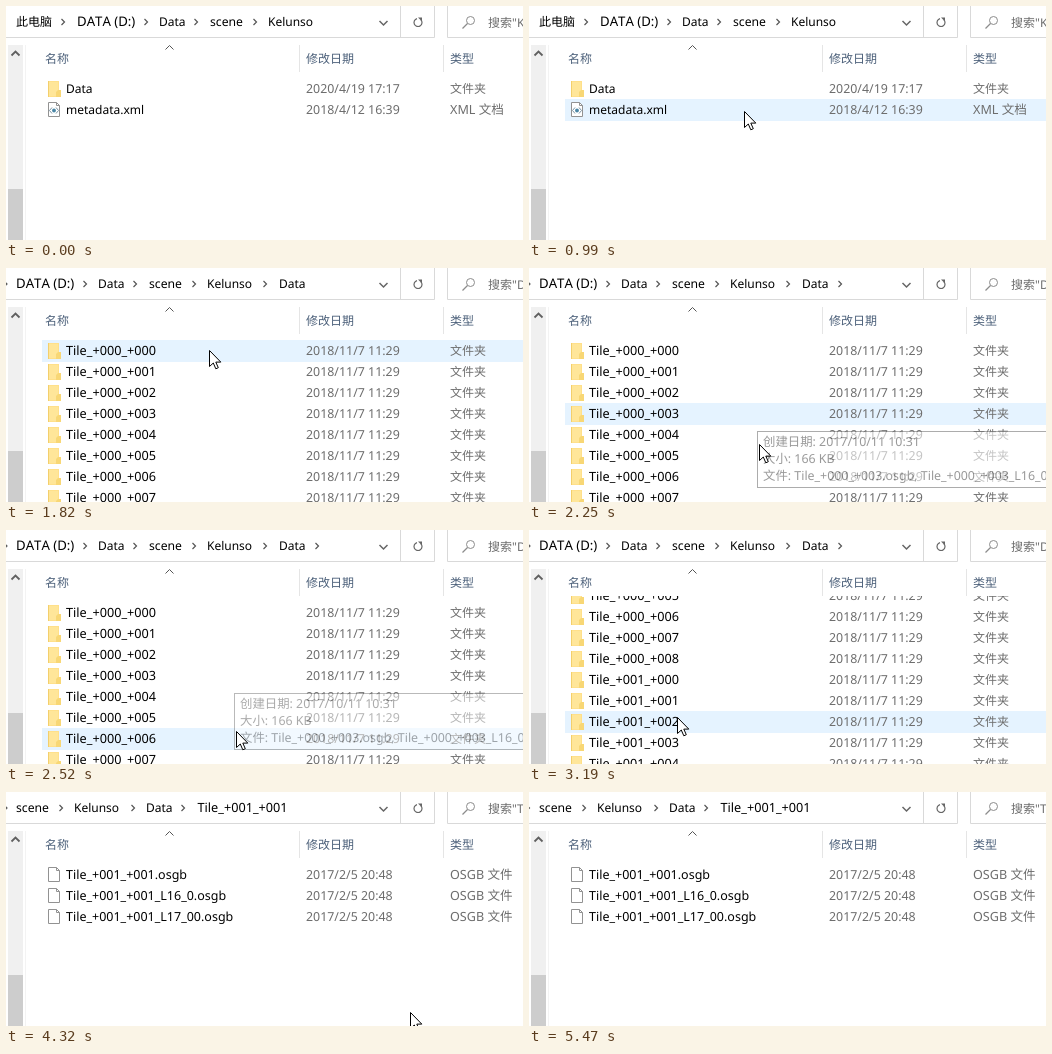
An HTML page that plays this animation: 517x234 px, repeating every 5570 ms.

```html
<!DOCTYPE html>
<html lang="zh-CN">
<head>
<meta charset="utf-8">
<title>文件夹浏览</title>
<style>
  html, body { margin: 0; width: 100%; height: 100%; overflow: hidden; background: #fff; }
  svg { display: block; }
  text {
    font-family: "Noto Sans", "Noto Sans CJK SC", sans-serif;
    font-kerning: none;
    text-rendering: geometricPrecision;
    white-space: pre;
  }
  .line { fill: none; stroke-linecap: butt; }
</style>
</head>
<body>
<svg id="stage" width="517" height="234" viewBox="0 0 517 234">
  <defs>
    <clipPath id="pane"><rect y="66" width="517" height="168"/></clipPath>
    <g id="folder">
      <path d="M42 3h11v16H42z" fill="#ffe08a"/>
      <path d="M42 3h1v16h-1z" fill="#f3cf6c"/>
      <path d="M43 4h9v14h-9z" fill="#ffe699"/>
      <path d="M52 12h3v7h-5v-5z" fill="#f8d775"/>
    </g>
    <g id="page">
      <path d="M42.5 3.5h8l3 3v11h-11z" fill="#fff" stroke="#929292"/>
      <path d="M50.5 3.5v3h3" class="line" stroke="#929292"/>
    </g>
    <g id="xml">
      <use href="#page"/>
      <path d="M46 8.5l-2.5 3l2.5 3M50 8.5l2.5 3l-2.5 3" class="line" stroke="#7d95a5"/>
      <circle cx="48" cy="11.5" r="1.9" fill="#4a86a5"/>
    </g>
    <path id="next" class="line" d="M-1.5 -3L1.5 0L-1.5 3" stroke="#555" stroke-width="1.2"/>
  </defs>

  <rect width="517" height="234" fill="#fff"/>
  <rect id="mark" x="36" width="481" height="22"/>
  <g id="views"></g>

  <!-- address bar and search box -->
  <path class="line" d="M0 31.5H428.5V0M394.5 0V31M441.5 0V31.5H517" stroke="#d9d9d9"/>
  <path class="line" d="M373.5 15l4 4l4 -4" stroke="#666" stroke-width="1.5"/>
  <path class="line" d="M414.8 13.6A4 4 0 1 1 411 12.6" stroke="#666" stroke-width="1.2"/>
  <path d="M412 11.5h4v4z" fill="#666"/>
  <circle class="line" cx="464.5" cy="14.5" r="4" stroke="#8c8c8c"/>
  <path class="line" d="M461.5 17.5l-5 5" stroke="#8c8c8c" stroke-width="1.2"/>

  <!-- navigation scrollbar -->
  <rect x="2" y="39" width="15" height="195" fill="#f0f0f0"/>
  <rect x="2" y="183" width="15" height="51" fill="#cdcdcd"/>
  <path class="line" d="M19.5 39V234" stroke="#f3f3f3"/>
  <path class="line" d="M5.5 49.5l4 -4l4 4" stroke="#606060" stroke-width="1.8"/>

  <!-- column heads -->
  <path class="line" d="M293.5 39V66M437.5 39V66" stroke="#e5e5e5"/>
  <path class="line" d="M159.5 43.5l4 -4l4 4" stroke="#555"/>
  <g id="heads"></g>

  <g id="tip">
    <rect x="228.5" y="163.5" width="300" height="56" fill="#fff" stroke="#767676"/>
  </g>
  <path id="cursor" d="M.5 .5V16.5L4.3 13L6.8 18.8L9.3 17.7L6.8 12.1H11.8Z" fill="#fff" stroke="#000"/>
</svg>
<script>
const LOOP = 5570, ROW = 21, TOP = 72;
const GRAY = '#6d6d6d', HEAD = '#4c607a';
const $ = id => document.getElementById(id);

function add(parent, tag, attrs, content) {
  const el = document.createElementNS('http://www.w3.org/2000/svg', tag);
  for (const key in attrs) el.setAttribute(key, attrs[key]);
  if (content) el.textContent = content;
  parent.appendChild(el);
  return el;
}
const label = (parent, x, y, str, size = 12, fill = '#000') =>
  add(parent, 'text', { x, y, 'font-size': size, fill }, str);
const chevron = (parent, x) => add(parent, 'use', { href: '#next', x, y: 16 });

// crumbs: [x, name, size, x of the chevron behind it]
function makeView({ crumbs, search, rows, lead }) {
  const view = add($('views'), 'g', {});
  if (lead) chevron(view, lead).setAttribute('class', 'lead');
  for (const [x, name, size, next] of crumbs) {
    label(view, x, 20, name, size);
    if (next) chevron(view, next);
  }
  label(view, 482, 21, `搜索"${search}"`, 12, GRAY);
  const list = add(add(view, 'g', { 'clip-path': 'url(#pane)' }), 'g', {});
  rows.forEach(([icon, name, date, type, size = 12.7], i) => {
    const row = add(list, 'g', { transform: `translate(0 ${TOP + i * ROW})` });
    add(row, 'use', { href: '#' + icon });
    label(row, 60, 15, name, size);
    label(row, 300, 15, date, 12.4, GRAY);
    label(row, 444, 15, type, type === '文件夹' ? 12 : 12.6, GRAY);
  });
  return { view, list };
}

const tiles = Array.from({ length: 16 }, (_, i) =>
  ['folder', `Tile_+00${Math.floor(i / 9)}_+00${i % 9}`, '2018/11/7 11:29', '文件夹']);
const models = ['', '_L16_0', '_L17_00'].map(part =>
  ['page', `Tile_+001_+001${part}.osgb`, '2017/2/5 20:48', 'OSGB 文件', 12.5]);

const views = [
  {
    search: 'Kelunso',
    crumbs: [[10, '此电脑', 12, 57], [71, 'DATA (D:)', 13.2, 140], [153, 'Data', 12, 190],
      [204, 'scene', 12.2, 249], [262, 'Kelunso', 12]],
    rows: [['folder', 'Data', '2020/4/19 17:17', '文件夹', 12],
      ['xml', 'metadata.xml', '2018/4/12 16:39', 'XML 文档', 12]]
  },
  {
    search: 'Data', lead: -0.5,
    crumbs: [[10, 'DATA (D:)', 13.2, 79], [92, 'Data', 12, 129], [143, 'scene', 12.2, 188],
      [201, 'Kelunso', 12, 259], [273, 'Data', 12]],
    rows: tiles
  },
  {
    search: 'Tile_+001_+001', lead: -0.5,
    crumbs: [[10, 'scene', 12.2, 55], [68, 'Kelunso', 12, 127], [140, 'Data', 12, 177],
      [191.5, 'Tile_+001_+001', 12.7]],
    rows: models
  }
].map(makeView);
const lead = views[2].view.querySelector('.lead');
const more = chevron(views[1].view, 311);

label($('heads'), 39, 57, '名称', 12, HEAD);
label($('heads'), 300, 57, '修改日期', 12, HEAD);
label($('heads'), 444, 57, '类型', 12, HEAD);
['创建日期: 2017/10/11 10:31', '大小: 166 KB', '文件: Tile_+000_+003.osgb, Tile_+000_+003_L16_0.osgb']
  .forEach((str, i) => label($('tip'), 234, 178 + i * 17, str, 12.4, '#575757'));

// Each step changes only what it names; the rest carries over.
let state = { view: 0, scroll: 0, pos: null, row: -1, picked: false, tip: 0, edge: -0.5, more: false };
const steps = [
  { t: 0 },
  { t: 990, pos: [215, 105], row: 1 },
  { t: 1120, pos: [210, 96] },
  { t: 1270, pos: [207, 84], row: 0 },
  { t: 1390, pos: [203, 82] },
  { t: 1540, picked: true },
  { t: 1820, view: 1, picked: false },
  { t: 1970, pos: [212, 112], row: 1, more: true },
  { t: 2100, pos: [228, 153] },
  { t: 2250, pos: [230, 176], row: 3, tip: 0.6 },
  { t: 2370, pos: [230, 201], row: 4, tip: 0.9 },
  { t: 2520, row: 6, tip: 0.5 },
  { t: 2650, tip: 0.25 },
  { t: 2800, tip: 0 },
  { t: 2950, pos: [196, 198], scroll: 41, row: 7 },
  { t: 3070, pos: [165, 191], scroll: 82, row: 9 },
  { t: 3190, pos: [148, 187], scroll: 122, row: 11 },
  { t: 3350, pos: [138, 172], row: 10 },
  { t: 3500, pos: [127, 170] },
  { t: 3780, picked: true },
  { t: 4060, view: 2, scroll: 0, row: -1, picked: false },
  { t: 4200, pos: [250, 190] },
  { t: 4320, pos: [404, 220] },
  { t: 4450, pos: null },
  { t: 5470, edge: -1 }
].map(step => (state = { ...state, ...step }));

function show(s) {
  views.forEach(({ view, list }, i) => {
    view.style.display = i === s.view ? '' : 'none';
    list.setAttribute('transform', `translate(0 ${-s.scroll})`);
  });
  lead.setAttribute('x', s.edge);
  more.style.display = s.more ? '' : 'none';

  const mark = $('mark'), inset = s.picked ? 0.5 : 0;
  mark.style.display = s.row < 0 ? 'none' : '';
  mark.setAttribute('x', 36 + inset);
  mark.setAttribute('y', TOP + s.row * ROW - s.scroll + inset);
  mark.setAttribute('height', 22 - 2 * inset);
  mark.setAttribute('fill', s.picked ? '#cce8ff' : '#e5f3ff');
  mark.setAttribute('stroke', s.picked ? '#99d1ff' : 'none');

  $('tip').style.opacity = s.tip;
  $('cursor').style.display = s.pos ? '' : 'none';
  if (s.pos) $('cursor').setAttribute('transform', `translate(${s.pos})`);
}

let current;
function frame() {
  const t = performance.now() % LOOP;
  const next = steps.findLast(s => s.t <= t);
  if (next !== current) show(current = next);
  requestAnimationFrame(frame);
}
frame();
</script>
</body>
</html>
```
